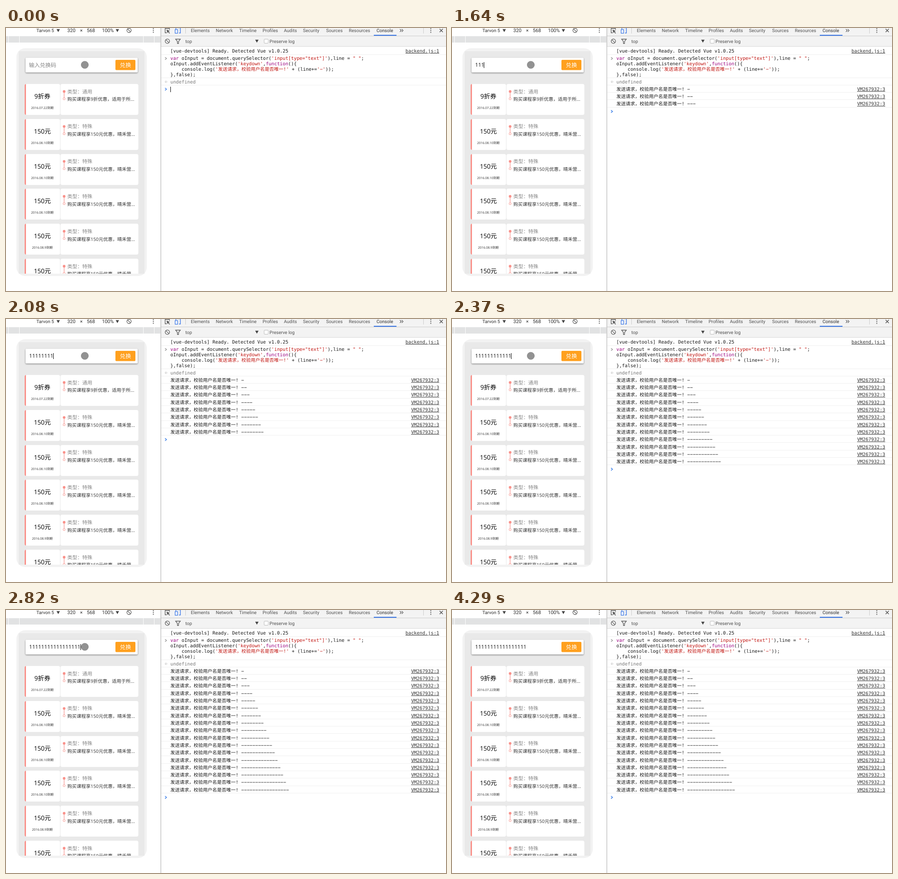
Write an HTML page that moves like this. It is 969 by 578 pixels and loops after 4.39 s.

```html
<!DOCTYPE html>
<html lang="zh-CN">
<head>
<meta charset="utf-8">
<title>Console demo</title>
<style>
html, body { margin: 0; width: 100%; height: 100%; overflow: hidden; background: #fff; }
svg { display: block; }
text { white-space: pre; text-rendering: geometricPrecision; }
.ui { font: 10.05px Roboto, sans-serif; fill: #505050; }
.dark { fill: #2c2c2c; }
.num { font-size: 10.7px; fill: #2c2c2c; }
.mono { font: 10.28px "DejaVu Sans Mono", "Noto Sans CJK SC", "Noto Sans CJK", monospace; fill: #161616; }
.page { font-family: "Open Sans", "Noto Sans CJK SC", "Noto Sans CJK", sans-serif; fill: #333; }
.link { text-anchor: end; text-decoration: underline; fill: #333; }
.mid { text-anchor: middle; }
.icon { fill: none; stroke: #5a5a5a; stroke-width: 1.3; }
.kw { fill: #9a007f; }
.str { fill: #c0140f; }
</style>
</head>
<body>
<svg width="969" height="578" viewBox="0 0 969 578">
  <defs>
    <clipPath id="screen"><rect x="28" y="51" width="277" height="489"/></clipPath>
    <filter id="shadow" x="-10%" y="-30%" width="120%" height="180%">
      <feDropShadow dx="0" dy="1.3" stdDeviation="1.8" flood-opacity=".5"/>
    </filter>
  </defs>
  <g id="still"></g>
  <g id="live"></g>
</svg>
<script>
const LOOP = 4390, ROW = 16.31;
const DASH = '\u2212'; // wide dash, as long as the hyphen of the console font
const byId = id => document.getElementById(id);
const rect = (x, y, w, h, fill, more = '') =>
  `<rect x="${x}" y="${y}" width="${w}" height="${h}" fill="${fill}" ${more}/>`;
const text = (x, y, s, cls, more = '') => `<text x="${x}" y="${y}" class="${cls}" ${more}>${s}</text>`;
const page = (x, y, s, size, more = '', cls = '') =>
  text(x, y, s, 'page ' + cls, `style="font-size:${size}px;${more}"`);
const path = (d, more = 'class="icon"') => `<path d="${d}" ${more}/>`;
const circle = (x, y, r, more) => `<circle cx="${x}" cy="${y}" r="${r}" ${more}/>`;
const down = (x, y) => path(`M${x - 3.7} ${y - 3}h7.4l-3.7 6.4z`, 'fill="#444"');
const dots = (x, y) => [-4, 0, 4].map(d => rect(x - 1, y + d - 1, 2, 2, '#5a5a5a')).join('');
const barred = (x, y, r) => circle(x, y, r, 'class="icon"') +
  path(`M${x - r * .7} ${y - r * .7}l${r * 1.4} ${r * 1.4}`);
const chevron = (y, color) => path(`M350.3 ${y - 2.8}l3.2 2.8-3.2 2.8`,
  `fill="none" stroke="${color}" stroke-width="1.5"`);
const rule = y => rect(342, y, 627, 1, '#f0f0f0');
const span = (cls, s) => `<tspan class="${cls}">${s}</tspan>`;

function deviceBar() {
  return text(67, 9.4, 'Tarvon 5', 'ui dark') + down(115, 5.5) +
    text(135, 9.4, '320', 'ui num') + text(163, 9.4, '×', 'ui num') +
    text(178, 9.4, '568', 'ui num') + text(211.5, 9.4, '100%', 'ui num') + down(245.3, 5.5) +
    barred(271, 5.3, 4.7) + dots(324.5, 5.5) +
    rect(0, 18, 340, 14, '#e1e2e3') +
    [5, 29, 302, 326].map(x => rect(x, 18, 1, 14, '#fff')).join('');
}

function coupon(i) {
  const y = 123 + i * 76.8, top = Math.round(y), pink = '#f9918a';
  const date = ['07.22', '08.10', '08.10', '08.10', '08.9', '08.9'][i];
  const price = i ? '150元' : '9折券';
  const offer = i ? '购买课程享150元优惠，晴禾营...' : '购买课程享9折优惠，适用于所...';
  return rect(41, top, 20, 68, pink, 'rx="4"') +
    path(`M44 ${top}h71q4 0 4 4v60q0 4-4 4h-71z`, 'fill="#fff"') +
    rect(120, top, 171.5, 68, '#fff', 'rx="4"') +
    rect(119, top + 4, 1, 60, '#e8e8e8') +
    page(80, y + 32, price, 13.7, 'fill:#000', 'mid') +
    page(80, y + 55, `2016.${date}到期`, 7, '', 'mid') +
    page(135, y + 20.6, '类型：' + (i ? '特殊' : '通用'), 11, 'fill:#888') +
    page(135, y + 37.3, offer, 10.28) +
    circle(128, y + 16.5, 2.9, `fill="${pink}"`) +
    path(`M128 ${y + 19}v11.2`, `stroke="${pink}" stroke-width="1.2"`) +
    circle(128, y + 32.6, 2.3, `fill="#fff" stroke="${pink}"`);
}

function phone() {
  return rect(23, 44.5, 287, 500.5, '#f2f2f2', 'rx="19"') +
    rect(28, 51, 277, 489, '#e9e9e9') +
    '<g clip-path="url(#screen)">' +
    rect(43, 65.5, 247, 32, '#fff', 'rx="2" filter="url(#shadow)"') +
    rect(241, 70, 44, 22.5, '#ffa01e', 'rx="2"') +
    page(263, 85.6, '兑换', 12.4, 'fill:#fff;font-weight:500', 'mid') +
    [0, 1, 2, 3, 4, 5].map(coupon).join('') + '</g>';
}

function devtools() {
  const tabs = { Elements: 407, Network: 462, Timeline: 513.5, Profiles: 565, Audits: 612,
    Security: 654, Sources: 705, Resources: 755, Console: 816 };
  const bar = rect(341, 0, 628, 40, '#f3f3f3') + rect(341, 17, 628, 1, '#ccc') +
    rect(341, 40, 628, 1, '#d8d8d8') + rect(340.5, 0, 1, 578, '#a3a3a3') +
    path('M354 10.5h-3.5v-9.5h9.5v3') +
    path('M353.5 3.5l7.5 3-3 1.2 3 3.5-1.2 1-3-3.4-1.5 2.5z', 'fill="#5a5a5a"') +
    path('M374 2.5v-3h10v11.5h-3', 'fill="none" stroke="#3b78e7" stroke-width="1.4"') +
    rect(372.5, 3.5, 5.5, 8, '#fff', 'stroke="#3b78e7" stroke-width="1.3"') +
    rect(395, 0, 1, 12, '#ccc') +
    Object.entries(tabs).map(([s, x]) =>
      text(x, 9.4, s, s == 'Console' ? 'ui dark' : 'ui')).join('') +
    rect(810, 15, 50, 2, '#3b78e7') +
    path('M867.5 2.5l3 3-3 3M871.5 2.5l3 3-3 3') +
    rect(919, 0, 1, 12, '#ccc') + dots(935.5, 5.5) +
    path('M955 2l7 7M962 2l-7 7', 'stroke="#5a5a5a" stroke-width="1.6"') +
    barred(355.4, 29, 4.8) + path('M373.5 24.5h10.5l-4 5v4.5h-2.5v-4.5z') +
    text(395, 32.5, 'top', 'ui') + down(552.5, 28.8) +
    rect(568.5, 24.5, 9, 9, '#fff', 'rx="1.5" stroke="#bbb"') +
    text(580.3, 32.5, 'Preserve log', 'ui');
  const code = [
    span('kw', 'var') + ' oInput = document.querySelector(' +
      span('str', `'input[type="text"]'`) + '),line = ' + span('str', '" "') + ';',
    'oInput.addEventListener(' + span('str', "'keydown'") + ',' + span('kw', 'function') + '(){',
    '    console.log(' + span('str', "'发送请求，校验用户名是否唯一!'") +
      ' + (line+=' + span('str', `'${DASH}'`) + '));',
    '},false);'
  ];
  return bar + text(362, 54, '[vue-devtools] Ready. Detected Vue v1.0.25', 'mono') +
    text(954, 54, 'backend.js:1', 'mono link') + rule(58) +
    code.map((s, i) => text(362, 70.4 + i * 11.9, s, 'mono')).join('') + chevron(67, '#999') +
    rule(109) + text(362, 121.8, 'undefined', 'mono', 'style="fill:#777"') +
    path('M353 115.8l-2.7 2.5 2.7 2.5', 'fill="none" stroke="#aaa"') +
    rect(353.5, 117.6, 1.4, 1.4, '#aaa') + rule(125);
}

const logRow = i => {
  const y = i * ROW;
  return text(362, 137.8 + y, '发送请求，校验用户名是否唯一! ' + DASH.repeat(i + 1), 'mono') +
    text(954, 137.8 + y, 'VM267932:3', 'mono link') + rule(Math.floor(141.5 + y));
};

// [start, typed characters, logged rows]
const typing = [[0, 0, 0], [1040, 1, 1], [1640, 3, 3], [1790, 5, 5], [1930, 7, 6], [2080, 8, 8],
  [2230, 10, 10], [2370, 12, 12], [2520, 14, 14], [2670, 16, 16], [2820, 17, 17]];
const caretShown = [[290, 740], [1040, 3270], [3860, 4290]];
// [start, x, y]: round touch pointer first, then an arrow over the console
const pointer = [[0, 173.5, 81], [3120, 185.7, 91], [3270, 474.5, 262], [3420, 798, 448],
  [3570, 885, 549], [3710, 900.5, 569], [3860, -50, -50]];
const at = (steps, t) => steps.filter(s => s[0] <= t).pop();

function scene(t) {
  const [, chars, rows] = at(typing, t), [since, x, y] = at(pointer, t);
  let out = chars
    ? page(51, 85.4, '1'.repeat(chars), 11.63, 'fill:#111')
    : page(50.5, 85.8, '输入兑换码', 12, 'fill:#858585');
  for (let i = 0; i < rows; i++) out += logRow(i);
  out += chevron(134.5 + rows * ROW, '#3b7fe8');
  if (t < 150) out += rect(362, 129, 1, 12, '#000');
  if (caretShown.some(([a, b]) => t >= a && t < b))
    out += rect(Math.floor(51 + 6.65 * chars), 75, 1, 13, '#000');
  return out + (since < 3270
    ? circle(x, y, 8, 'fill="#929292" stroke="#858585" stroke-width=".8"')
    : path(`M${x} ${y}v13.5l3.2-3 2.2 5 2.3-1-2.2-4.8h4.8z`,
      'fill="#000" stroke="#fff" stroke-width=".9"'));
}

byId('still').innerHTML = deviceBar() + phone() + devtools();
let shown = '';
const start = performance.now();
function draw() {
  const next = scene((performance.now() - start) % LOOP);
  if (next !== shown) byId('live').innerHTML = shown = next;
  requestAnimationFrame(draw);
}
draw();
</script>
</body>
</html>
```
